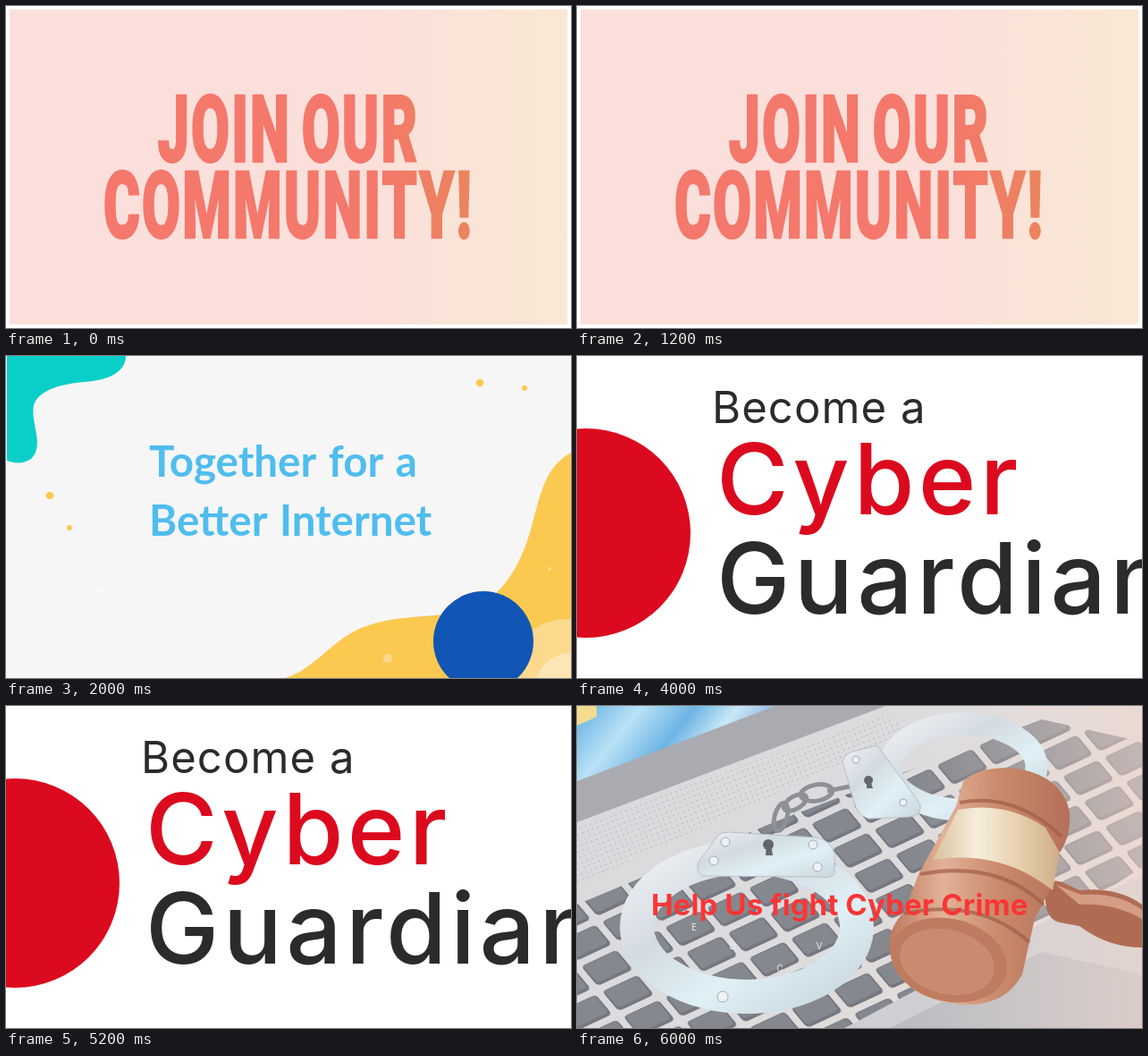
Animation of 632 by 360 pixels, one loop 8 s. Source, as an HTML page:

```html
<!DOCTYPE html>
<html lang="en">
<head>
<meta charset="utf-8">
<title>Join our community</title>
<style>
  html, body { margin: 0; width: 100%; height: 100%; overflow: hidden; background: #fff; }
  svg { display: block; width: 100vw; height: 100vh; }
  .slide { opacity: 0; animation: show 8s step-end infinite; animation-delay: calc(var(--i) * 2s - 8s); }
  @keyframes show { 0% { opacity: 1 } 25%, 100% { opacity: 0 } }
  .join { font: 900 104px Roboto, sans-serif; letter-spacing: 3.5px; word-spacing: -10px; fill: url(#coral); stroke: url(#coral); stroke-width: 2px; text-anchor: middle; }
  .join text { vector-effect: non-scaling-stroke; }
  .together { font: 700 47.5px Lato, sans-serif; word-spacing: 3px; fill: #4fbdee; }
  .guard { font: 540 110px Inter, sans-serif; letter-spacing: 4.4px; fill: #2b2b2b; }
  .become { font: 400 49px Inter, sans-serif; letter-spacing: 1.1px; fill: #2b2b2b; }
  .help { font: 700 33px Inter, sans-serif; letter-spacing: .1px; fill: #fb3535; }
  .caps { font: 10px Inter, sans-serif; fill: #eceef0; text-anchor: middle; }
</style>
</head>
<body>
<svg viewBox="0 0 632 360" preserveAspectRatio="none">
  <defs>
    <linearGradient id="peach">
      <stop offset=".6" stop-color="#fbdfdb"/><stop offset=".78" stop-color="#fae3d8"/><stop offset="1" stop-color="#fae7d3"/>
    </linearGradient>
    <linearGradient id="coral" gradientUnits="userSpaceOnUse" x1="-340" x2="340" y1="0" y2="0">
      <stop offset=".75" stop-color="#f4786b"/><stop offset="1" stop-color="#ea855d"/>
    </linearGradient>
    <linearGradient id="desk" x2="1" y2=".5">
      <stop stop-color="#d8d9dc"/><stop offset=".55" stop-color="#dcdcde"/><stop offset="1" stop-color="#e6dcd9"/>
    </linearGradient>
    <linearGradient id="screen" x2="1" y2=".3">
      <stop stop-color="#62aee2"/><stop offset=".3" stop-color="#b9e2f6"/><stop offset=".55" stop-color="#6db4e4"/><stop offset=".75" stop-color="#c9e8f7"/><stop offset="1" stop-color="#7ba6da"/>
    </linearGradient>
    <linearGradient id="steel" x2="1" y2="1">
      <stop stop-color="#eef0f2"/><stop offset=".35" stop-color="#d3dbe2"/><stop offset=".65" stop-color="#dff0f6"/><stop offset="1" stop-color="#c9d6de"/>
    </linearGradient>
    <linearGradient id="wood">
      <stop stop-color="#be795b"/><stop offset=".3" stop-color="#e3b299"/><stop offset=".6" stop-color="#ca8a6b"/><stop offset="1" stop-color="#b47058"/>
    </linearGradient>
    <linearGradient id="brass">
      <stop stop-color="#d9c19c"/><stop offset=".35" stop-color="#f7eedd"/><stop offset=".7" stop-color="#e5cda9"/><stop offset="1" stop-color="#cfae8a"/>
    </linearGradient>
    <linearGradient id="haze" x2="1" y2="0">
      <stop offset=".6" stop-color="#f0ddd6" stop-opacity="0"/><stop offset="1" stop-color="#f0d6cb" stop-opacity=".6"/>
    </linearGradient>
    <pattern id="keys" width="52" height="38" patternUnits="userSpaceOnUse" patternTransform="matrix(.9 -.42 .62 .74 92 246)">
      <rect x="4" y="4" width="44" height="30" rx="5" fill="#74777f"/>
      <rect x="6" y="5" width="40" height="25" rx="4" fill="#85888f"/>
    </pattern>
    <pattern id="holes" width="6" height="6" patternUnits="userSpaceOnUse" patternTransform="rotate(-21)">
      <circle cx="3" cy="3" r="1" fill="#bdbfc4"/>
    </pattern>
  </defs>

  <g class="slide" style="--i:0">
    <rect width="632" height="360" fill="#fff"/>
    <rect x="4" y="4" width="624" height="352" fill="url(#peach)"/>
    <g class="join" transform="translate(316 0) scale(.6 1)">
      <text y="174">JOIN OUR</text>
      <text y="259">COMMUNITY!</text>
    </g>
  </g>

  <g class="slide" style="--i:1">
    <rect width="632" height="360" fill="#f6f6f6"/>
    <path fill="#0acfc8" d="M1 0H134C134 18 115 27 88 29C55 32 36 40 31 55C27 75 44 100 28 115C18 122 6 119 1 117Z"/>
    <path fill="#fbc950" d="M632 108C595 128 596 175 580 215C566 250 545 280 500 288C470 292 430 290 395 305C360 322 345 350 312 360H632Z"/>
    <circle cx="628" cy="365" r="71" fill="#fcd98c"/>
    <circle cx="632" cy="373" r="41" fill="#fde6b5"/>
    <g fill="#fbc950">
      <circle cx="530" cy="30" r="4.3"/><circle cx="580" cy="36" r="3"/>
      <circle cx="49" cy="156" r="4.3"/><circle cx="71" cy="192" r="3"/>
    </g>
    <g fill="#fcd98c"><circle cx="427" cy="338" r="5"/><circle cx="608" cy="238" r="2.3"/></g>
    <path d="M96 263H112" stroke="#fff"/>
    <circle cx="534" cy="319" r="56" fill="#1156b5"/>
    <g class="together">
      <text x="160" y="135">Together for a</text>
      <text x="160" y="201">Better Internet</text>
    </g>
  </g>

  <g class="slide" style="--i:2">
    <rect width="632" height="360" fill="#fff"/>
    <circle cx="10" cy="198" r="117" fill="#dc0a1e"/>
    <text class="become" x="151" y="75">Become a</text>
    <g class="guard">
      <text x="156" y="177" style="fill:#dc0a1e">Cyber</text>
      <text x="156" y="288">Guardian</text>
    </g>
  </g>

  <g class="slide" style="--i:3">
    <rect width="632" height="360" fill="url(#desk)"/>
    <path fill="#a9abb0" d="M0 0H345L0 130Z"/>
    <path fill="url(#screen)" d="M0 0H222L0 84Z"/>
    <path fill="#f3dc8e" d="M0 0H22V12L0 22Z"/>
    <path fill="url(#holes)" d="M0 135L345 8L375 30L0 200Z"/>
    <path fill="url(#keys)" d="M0 222L225 128L330 88L520 15L632 40V180L540 240L300 360H0Z"/>
    <g class="caps">
      <text x="131" y="251">E</text><text x="174" y="272">D</text><text x="117" y="302">S</text>
      <text x="227" y="297">C</text><text x="271" y="272">V</text>
    </g>
    <path fill="#cfcfd3" d="M300 360L540 232L632 190V360Z"/>
    <path fill="#bcbdc2" d="M350 360L520 275L632 300V360Z"/>
    <rect width="632" height="360" fill="url(#haze)"/>

    <g fill="none" stroke="url(#steel)">
      <ellipse cx="432" cy="68" rx="82" ry="48" stroke-width="25"/>
      <ellipse cx="190" cy="247" rx="123" ry="78" stroke-width="38"/>
    </g>
    <g fill="none" stroke="#8d9096" stroke-width="5">
      <ellipse cx="228" cy="124" rx="7" ry="16" transform="rotate(15 228 124)"/>
      <ellipse cx="244" cy="108" rx="14" ry="7" transform="rotate(-30 244 108)"/>
      <ellipse cx="268" cy="97" rx="18" ry="9" transform="rotate(-10 268 97)"/>
      <path d="M280 95L305 90"/>
    </g>
    <g fill="url(#steel)" stroke="#b9bec5">
      <path d="M135 176L158 144Q162 141 170 141L268 147Q284 150 288 166V188Q284 193 270 191L140 190Q134 188 135 176Z"/>
      <path d="M297 62Q300 52 312 50L336 44L384 110Q386 122 372 124L326 126Q314 122 310 108Z"/>
    </g>
    <g fill="#63666d">
      <circle cx="214" cy="155" r="6"/><path d="M212 155H217L219 167H211Z"/>
      <circle cx="326" cy="83" r="5"/><path d="M324 83H328L331 92H324Z"/>
    </g>
    <g fill="#eef1f4" stroke="#a5acb5">
      <circle cx="166" cy="152" r="5"/><circle cx="264" cy="155" r="5"/>
      <circle cx="153" cy="173" r="5"/><circle cx="269" cy="180" r="5"/>
      <circle cx="163" cy="325" r="6"/><circle cx="312" cy="60" r="4"/><circle cx="365" cy="108" r="4"/>
    </g>

    <path fill="#b06c53" d="M524 207Q528 190 545 198L562 206Q604 202 632 222V270Q594 270 562 246L540 242Q522 238 524 207Z"/>
    <path fill="#d59d83" d="M536 200L564 211Q604 208 632 228V238Q600 220 562 222Z"/>
    <path fill="url(#wood)" d="M350 276Q346 250 366 230L382 188L424 112L432 84Q452 66 492 70Q542 78 551 118Q553 146 540 164L532 200L512 238L498 300Q480 334 436 334Q362 330 350 276Z"/>
    <path fill="url(#brass)" d="M398 172L426 116Q480 106 524 136L540 164L532 206Q474 160 398 172Z"/>
    <g fill="none" stroke="#a05e46" stroke-width="4" opacity=".7">
      <path d="M428 108Q490 96 542 146"/>
      <path d="M384 188Q470 172 522 222"/>
      <path d="M366 232Q450 214 506 264"/>
    </g>
    <ellipse cx="416" cy="284" rx="66" ry="46" transform="rotate(14 416 284)" fill="#bf7b5f"/>
    <ellipse cx="414" cy="286" rx="54" ry="36" transform="rotate(14 414 286)" fill="#c98b70"/>
    <text class="help" x="83" y="234">Help Us fight Cyber Crime</text>
  </g>
</svg>
</body>
</html>
```
